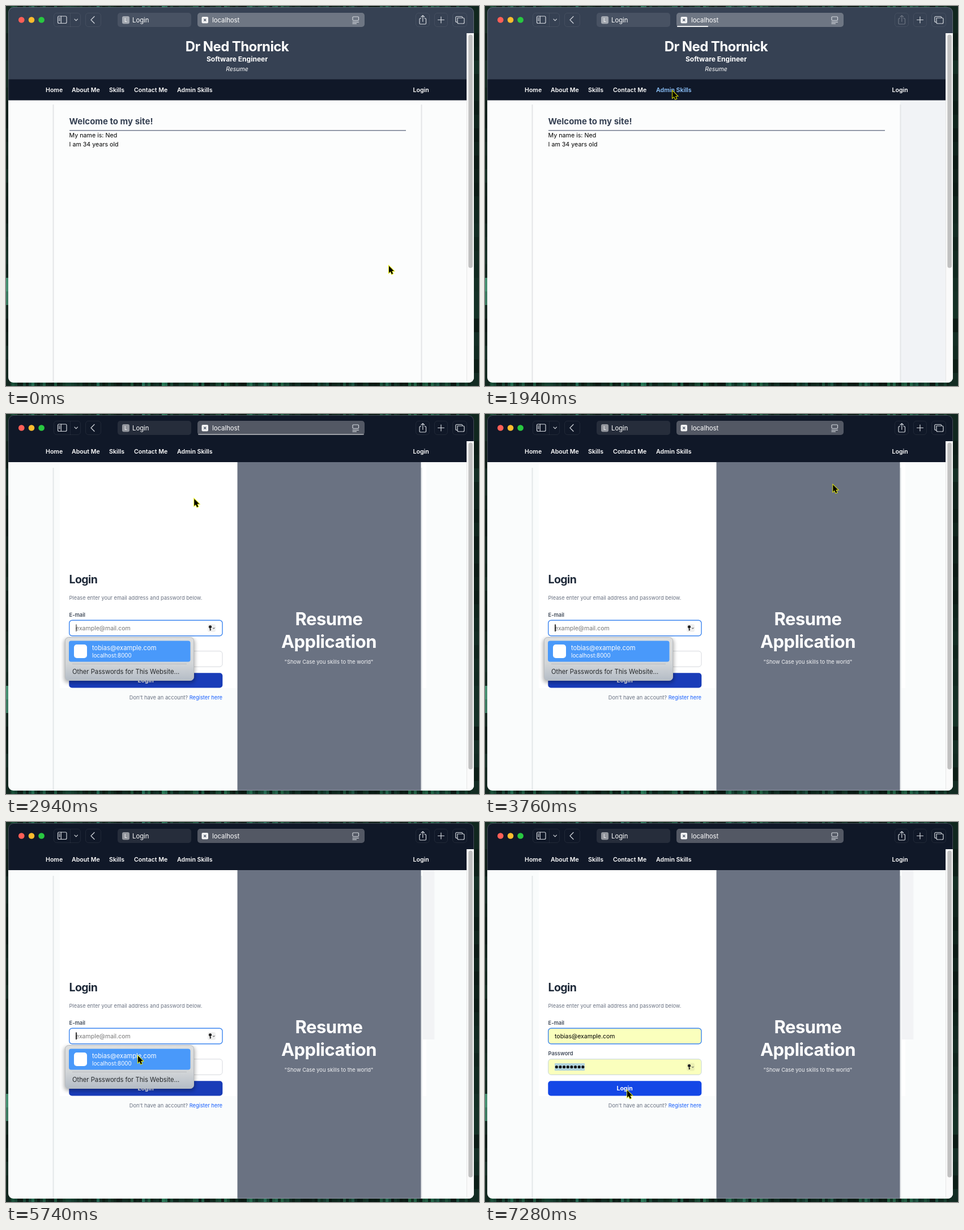
An HTML page that plays this animation: 835x671 px, repeating every 8 s.

```html
<!DOCTYPE html>
<html lang="en">
<head>
<meta charset="utf-8">
<title>Resume site login</title>
<style>
  html, body { margin: 0; width: 100%; height: 100%; overflow: hidden; background: #0b2219; }
  svg { display: block; width: 835px; height: 671px; font-family: Inter, "Open Sans", sans-serif; font-size: 10.5px; }
  .b { font-weight: 700; }
  .sb { font-weight: 600; }
  .mid { text-anchor: middle; }
  .w { fill: #fff; }
  .icon { fill: none; stroke: #d3d7dd; stroke-width: 1.2; stroke-linecap: round; stroke-linejoin: round; }
</style>
</head>
<body>
<svg viewBox="0 0 835 671">
  <defs>
    <clipPath id="frame"><rect x="4" y="2" width="822" height="663" rx="9"/></clipPath>
    <linearGradient id="menuFill" x2="0" y2="1">
      <stop stop-color="#dedfdf"/><stop offset=".6" stop-color="#d3d6d8"/><stop offset="1" stop-color="#b4bcc6"/>
    </linearGradient>
    <filter id="soft" x="-10%" y="-20%" width="120%" height="140%"><feGaussianBlur stdDeviation="3"/></filter>
    <g id="key">
      <rect x="-7" y="-7" width="14" height="14" rx="3" fill="#000" opacity=".06"/>
      <circle cx="-2.5" cy="-2.2" r="2.6" fill="#222"/>
      <path d="M-2.5 0v4.6M-2.5 3h1.6" stroke="#222" stroke-width="1.5"/>
      <path d="M2 -.6l1.8 1.7 1.8-1.7" fill="none" stroke="#333"/>
    </g>
  </defs>

  <g id="desk"></g>
  <g clip-path="url(#frame)">
    <g id="home">
      <path d="M4 2h822v128H4z" fill="#364153"/>
      <path d="M4 166h822v500H4z" fill="#fbfcfc"/>
      <path id="margin" d="M733 167h80v498h-80z" fill="#f1f3f6"/>
      <path d="M84 174h649v492H84z" fill="#fcfdfd"/>
      <path d="M83.5 174v492M733.5 174v492" stroke="#e3e5e7" stroke-width="2"/>
      <g class="mid w">
        <text x="408" y="80" class="b" font-size="24" letter-spacing="-.6">Dr Ned Thornick</text>
        <text x="408" y="97.5" class="b" font-size="12">Software Engineer</text>
        <text x="408" y="114.5" font-size="10.5" font-style="italic">Resume</text>
      </g>
      <text x="111.5" y="209" class="b" font-size="15" fill="#364153">Welcome to my site!</text>
      <path d="M112 219.7h594" stroke="#757c90" stroke-width="1.4"/>
      <g font-size="10.7"><text x="111.5" y="232">My name is: Ned</text><text x="111.5" y="248">I am 34 years old</text></g>
    </g>

    <g id="login">
      <path d="M4 2h822v84H4z" fill="#101828"/>
      <path d="M4 85h822v581H4z" fill="#fafcfc"/>
      <path d="M83.5 95v571M733.5 95v571" stroke="#e3e6e8" stroke-width="2"/>
      <path id="paper" d="M95 85h314v399H95zM736 85h6v399h-6z" fill="#fff"/>
      <path id="strip" d="M736 85h20.5v299H736z" fill="#f2f3f5"/>
      <path d="M408.5 85H732.5v581H408.5z" fill="#6a7282"/>
      <g class="mid w">
        <g class="b" font-size="31" letter-spacing="-.5"><text x="570" y="373">Resume</text><text x="570" y="412.5">Application</text></g>
        <text x="570" y="441" font-size="9.35" fill="#f3f4f6">"Show Case you skills to the world"</text>
      </g>
      <text x="111.5" y="298.5" class="b" font-size="19.5" letter-spacing="-.6" fill="#1e2939">Login</text>
      <text x="111.5" y="328" font-size="9.25" fill="#6a7282">Please enter your email address and password below.</text>
      <g class="sb" font-size="9.3" fill="#414b5a"><text x="111.5" y="357.5">E-mail</text><text x="111.5" y="412">Password</text></g>
      <rect id="mail" x="111.7" y="364.2" width="270.3" height="27.6" rx="5" stroke="#3d86f0"/>
      <rect id="pass" x="111.7" y="418.7" width="270.3" height="27.6" rx="5"/>
      <g id="empty" fill="#767676">
        <text x="123" y="382">example@mail.com</text><text x="123" y="437" font-size="10.4">please enter your password</text>
        <use id="mailKey" href="#key" x="363" y="378"/>
        <path id="caret" d="M124 371.5v12.5" stroke="#000" stroke-width="1.6"/>
      </g>
      <g id="filled">
        <text x="123" y="381.5">tobias@example.com</text>
        <path d="M123 426h53v13h-53z" fill="#b2d4dd"/>
        <path d="M126.3 432.5h47" stroke="#111" stroke-width="5.2" stroke-linecap="round" stroke-dasharray="0 6.65"/>
        <use href="#key" x="363" y="432.5"/>
      </g>
      <rect id="button" x="111.3" y="457.3" width="271" height="26.2" rx="5"/>
      <text x="246.7" y="473.8" class="b mid w">Login</text>
      <text x="382" y="504" font-size="9.3" text-anchor="end" fill="#6a7282">Don't have an account? <tspan fill="#155dfc">Register here</tspan></text>
      <g id="menu">
        <rect x="102" y="396" width="232" height="79" rx="8" opacity=".28" filter="url(#soft)"/>
        <rect x="104.5" y="394.5" width="227" height="76" rx="6" fill="url(#menuFill)" stroke="#b9bcbf"/>
        <rect x="111" y="400.5" width="214.5" height="37" rx="4" fill="#4999fa"/>
        <rect x="120" y="407" width="23" height="24" rx="5" class="w"/>
        <text x="152" y="417" font-size="11.2" class="w">tobias@example.com</text>
        <text x="152" y="430" font-size="9.9" class="w">localhost:8000</text>
        <path d="M117 441.3h202" stroke="#b7babd"/>
        <text x="117" y="459" font-size="11.2" fill="#25282b">Other Passwords for This Website...</text>
      </g>
    </g>

    <g id="nav" class="sb w" font-size="10.6">
      <path d="M4 129.5h822v37H4z" fill="#101828"/>
      <text x="70" y="151.5">Home</text><text x="116" y="151.5">About Me</text><text x="182" y="151.5">Skills</text>
      <text x="226" y="151.5">Contact Me</text><text id="admin" x="302" y="151.5">Admin Skills</text><text id="signIn" x="718.5" y="151.5">Login</text>
    </g>

    <path d="M813 48h13v618h-13z" fill="#fafafa"/>
    <path d="M813.5 48v618" stroke="#e6e6e6"/>
    <rect id="thumb" x="816.3" y="50.5" width="7.6" rx="3.8" fill="#c1c1c1"/>

    <circle cx="27.3" cy="24.5" r="5.3" fill="#ff5f57"/>
    <circle cx="45" cy="24.5" r="5.3" fill="#febc2e"/>
    <circle cx="62.6" cy="24.5" r="5.3" fill="#28c840"/>
    <g fill="none" stroke="#fff" stroke-opacity=".07">
      <rect x="84.5" y="12.5" width="47" height="24" rx="5"/><path d="M113.5 13v24"/>
      <rect x="140.5" y="12.5" width="27" height="24" rx="5"/><rect x="723.5" y="12.5" width="24" height="24" rx="5"/>
      <rect x="756.5" y="12.5" width="23" height="24" rx="5"/><rect x="788.5" y="12.5" width="25" height="24" rx="5"/>
    </g>
    <g class="icon">
      <rect x="91.5" y="18" width="15.5" height="12.5" rx="2"/>
      <path d="M97.3 18v12.5M93.5 21h1.8M93.5 23.3h1.8M93.5 25.6h1.8M121 23.2l2.7 2.7 2.7-2.7M156 18.5l-6 6 6 6"/>
      <path d="M762.5 24.5h11M768 19v11"/>
      <path d="M797 21h10a2 2 0 0 1 2 2v6a2 2 0 0 1-2 2h-8a2 2 0 0 1-2-2zM797 28.5h-1.2a2 2 0 0 1-2-2v-6a2 2 0 0 1 2-2h8a2 2 0 0 1 2 2v.5"/>
      <path id="share" d="M732.5 21.8h-1a1.5 1.5 0 0 0-1.5 1.5v7.2a1.5 1.5 0 0 0 1.5 1.5h8.5a1.5 1.5 0 0 0 1.5-1.5v-7.2a1.5 1.5 0 0 0-1.5-1.5h-1M735.8 27.5V16.8M733 19.3l2.8-2.7 2.8 2.7"/>
    </g>
    <g class="w">
      <rect x="197" y="12" width="130" height="25" rx="5" opacity=".09"/>
      <rect x="338" y="12" width="295" height="25" rx="5" opacity=".28"/>
      <rect x="205" y="18" width="13" height="13.5" rx="3" opacity=".5"/>
      <text x="211.5" y="28" font-size="9" class="mid">L</text>
      <rect x="345.5" y="19" width="11.5" height="11.5" rx="2" opacity=".93"/>
      <path d="M349.2 22.7l4 4m0-4l-4 4" stroke="#4f596a" stroke-width="1.3"/>
      <text x="223" y="29" font-size="11.3">Login</text><text x="364" y="29" font-size="11.3">localhost</text>
      <rect id="progress" x="339" y="35.3" height="1.7" rx=".8"/>
    </g>
    <g class="icon"><rect x="612" y="19" width="10.5" height="6.5" rx="1.2"/><path d="M612 28.3h10.5M612 31.2h6.5"/></g>
    <rect x="4.5" y="2.5" width="821" height="662" rx="9" fill="none" stroke="#fff" stroke-opacity=".22"/>
  </g>
  <path id="cursor" d="M0 0v12.2l2.8-2.5 2.1 4.8 2.2-.9-2.1-4.7h3.8z" stroke="#e9ee00" stroke-width="1.9" paint-order="stroke"/>
</svg>
<script>
const LOOP = 8000, PAGE = 2180, FILL = 6400;
const $ = Object.fromEntries([...document.querySelectorAll('svg [id]')].map(e => [e.id, e]));
const set = (e, attrs) => { for (const k in attrs) e.setAttribute(k, attrs[k]); };
const show = (e, on) => set(e, { visibility: on ? 'inherit' : 'hidden' });
const ramp = (t, a, b) => Math.min(1, Math.max(0, (t - a) / (b - a)));

// Cursor stops: time, x, y
const path = [
  [0, 676, 459], [340, 676, 459], [1110, 331, 149], [1170, 331, 150], [2900, 331, 150],
  [3760, 614, 125], [4160, 741, 67], [4830, 741, 67], [4990, 528, 197], [5510, 233, 411],
  [5690, 233, 411], [5740, 233, 413], [5800, 233, 415], [6950, 233, 415], [7280, 251, 474], [LOOP, 251, 474]
];
const slope = (i, a) => (path[i + 1][a] - path[i][a]) / (path[i + 1][0] - path[i][0]);
function tangent(i, a) {
  if (!i || i === path.length - 1) return 0;
  const p = slope(i - 1, a), q = slope(i, a);
  return p * q > 0 ? 2 * p * q / (p + q) : 0;
}
// Monotone cubic between neighbouring stops
function along(t, a) {
  const i = path.findIndex((p, n) => n === path.length - 2 || t < path[n + 1][0]);
  const h = path[i + 1][0] - path[i][0], u = (t - path[i][0]) / h, v = 1 - u;
  return path[i][a] * v * v * (1 + 2 * u) + path[i + 1][a] * u * u * (3 - 2 * u)
    + h * u * v * (tangent(i, a) * v - tangent(i + 1, a) * u);
}

// Dark green wallpaper around the window
let seed = 7;
const rnd = () => (seed = seed * 16807 % 2147483647) / 2147483647;
function patch(x, y, width, height, fill) {
  const r = document.createElementNS('http://www.w3.org/2000/svg', 'rect');
  set(r, { x, y, width, height, fill });
  $.desk.append(r);
}
const green = () => `hsl(${150 + rnd() * 12} 50% ${6 + rnd() * rnd() * 26}%)`;
for (let x = 0; x < 835; x += 5) patch(x, 0, 5, 671, green());
for (let y = 0; y < 671; y += 24) {
  patch(0, y, 8, 24, `hsl(155 35% ${8 + rnd() * 7 + 35 * Math.exp(-(((y - 490) / 22) ** 2))}%)`);
  patch(822, y, 13, 24, `hsl(158 40% ${7 + rnd() * 7}%)`);
}

function draw(t) {
  const x = along(t, 1), y = along(t, 2);
  const over = (l, top, r, b) => x >= l && x <= r && y >= top && y <= b;
  const home = t < PAGE, filled = t >= FILL, loaded = t >= 2480;
  const link = on => ({ fill: on ? '#8ec5ff' : '#fff' });

  set($.cursor, { transform: `translate(${x} ${y})` });
  show($.home, home);
  show($.login, !home);
  show($.margin, t >= 1110);
  set($.nav, { transform: `translate(0 ${home ? 0 : -82})` });
  set($.thumb, { height: home ? 412 : 577 });
  set($.admin, link(home && over(302, 138, 366, 158)));
  set($.signIn, link(!home && over(718, 54, 748, 78)));
  set($.share, { opacity: t >= 1770 && !loaded ? .35 : 1 });
  set($.progress, {
    width: 55 * ramp(t, 1740, 1940) + 238 * ramp(t, 2450, 2770),
    opacity: 1 - ramp(t, 2880, 3000)
  });
  if (home) return;

  show($.paper, loaded);
  show($.strip, t >= 4100);
  show($.empty, !filled);
  show($.filled, filled);
  show($.mailKey, loaded);
  set($.mail, { fill: filled ? '#faffbd' : loaded ? '#fff' : '#fafcfc', 'stroke-width': loaded ? 1.4 : 1.1 });
  set($.pass, { fill: filled ? '#faffbd' : loaded ? '#fff' : '#fafcfc', stroke: filled ? '#c3d3dc' : '#d5d8dd' });
  set($.button, { fill: over(111, 457, 382, 484) ? '#1447e6' : '#193cb8' });
  set($.menu, { opacity: ramp(t, 2560, 2740) * (1 - ramp(t, FILL, 6570)) });
  const blink = (t - 4400 + 10500) % 1050;
  set($.caret, { opacity: loaded ? ramp(blink, -30, 50) * (1 - ramp(blink, 590, 710)) : 0 });
}

function tick() {
  draw(performance.now() % LOOP);
  requestAnimationFrame(tick);
}
tick();
</script>
</body>
</html>
```
